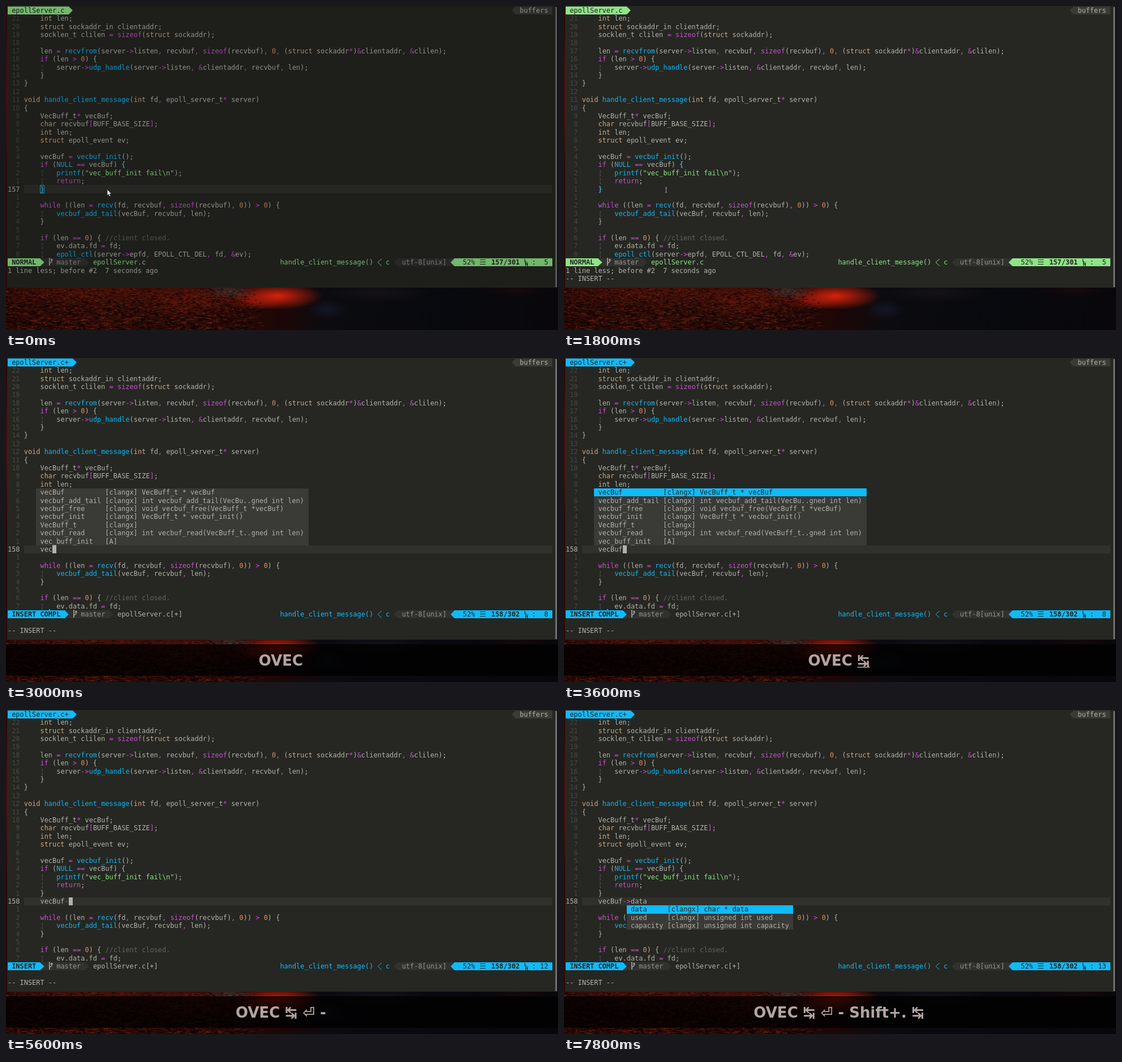
Animation, 976 px wide and 574 px high, one loop 8 s. Source, as an HTML page with a canvas:

```html
<!DOCTYPE html>
<html lang="en">
<head>
<meta charset="utf-8">
<title>Code completion</title>
<style>
  html, body { margin: 0; width: 100%; height: 100%; overflow: hidden; background: #000; }
  canvas { display: block; }
</style>
</head>
<body>
<canvas id="stage" width="976" height="574"></canvas>
<script>
const LOOP = 8000, CW = 7.185, RH = 14.4, X0 = 3, Y0 = 0.6, CENTER = 486;
const MONO = '11.93px "DejaVu Sans Mono", monospace';
const KEYS = 'bold 26px "DejaVu Sans", sans-serif';
const C = {
  bg: '#262722', line: '#30302c', text: '#b2b2aa', dark: '#22231f', num: '#464741', guide: '#5c5d56',
  type: '#cfa883', key: '#c94fd0', func: '#10b5f3', str: '#8be37f', lit: '#d98a66', note: '#63645d',
  green: '#8ee487', cyan: '#0fbbfb', panel: '#3a3a37', section: '#31322e'
};

const code = `    int len;
    struct sockaddr_in clientaddr;
    socklen_t clilen = sizeof(struct sockaddr);

    len = recvfrom(server->listen, recvbuf, sizeof(recvbuf), 0, (struct sockaddr*)&clientaddr, &clilen);
    if (len > 0) {
    ¦   server->udp_handle(server->listen, &clientaddr, recvbuf, len);
    }
}

void handle_client_message(int fd, epoll_server_t* server)
{
    VecBuff_t* vecBuf;
    char recvbuf[BUFF_BASE_SIZE];
    int len;
    struct epoll_event ev;

    vecBuf = vecbuf_init();
    if (NULL == vecBuf) {
    ¦   printf("vec_buff_init fail\\n");
    ¦   return;
    }

    while ((len = recv(fd, recvbuf, sizeof(recvbuf), 0)) > 0) {
    ¦   vecbuf_add_tail(vecBuf, recvbuf, len);
    }

    if (len == 0) { //client closed.
    ¦   ev.data.fd = fd;
    ¦   epoll_ctl(server->epfd, EPOLL_CTL_DEL, fd, &ev);`.split('\n');

const words = {
  col: 7, end: 74, row: 16,
  items: ['vecBuf          [clangx] VecBuff_t * vecBuf',
    'vecbuf_add_tail [clangx] int vecbuf_add_tail(VecBu..gned int len)',
    'vecbuf_free     [clangx] void vecbuf_free(VecBuff_t *vecBuf)',
    'vecbuf_init     [clangx] VecBuff_t * vecbuf_init()',
    'VecBuff_t       [clangx]',
    'vecbuf_read     [clangx] int vecbuf_read(VecBuff_t..gned int len)',
    'vec_buff_init   [A]']
};
const members = {
  col: 15, end: 56, row: 24,
  items: ['data     [clangx] char * data', 'used     [clangx] unsigned int used',
    'capacity [clangx] unsigned int capacity']
};

// Each step changes part of the state; the rest carries over.
const TAB = '↹', RET = '⏎';
const steps = [
  [0, { mouse: 'arrow', dim: true, mode: 'NORMAL', cursor: 'hollow', typed: null, col: 5, msg: true, insert: false, keys: null }],
  [100, { mouse: 'beam' }],
  [600, { dim: false, cursor: 'block' }],
  [1200, { cursor: '' }],
  [1800, { insert: true, moving: true }],
  [1900, { moving: false, mode: 'INSERT', typed: '', cursor: 'block', keys: 'O', under: 1 }],
  [2100, { under: 0 }],
  [2400, { keys: 'OV', under: 1 }],
  [2500, { typed: 'v', col: 6 }],
  [2600, { keys: 'OVE' }],
  [2700, { typed: 've', col: 7, cursor: '' }],
  [2800, { cursor: 'block', under: 0 }],
  [2900, { keys: 'OVEC', under: 1, typed: 'vec', mouse: '' }],
  [3000, { mode: 'INSERT COMPL', col: 8, popup: words, pick: -1, msg: false, under: 0 }],
  [3600, { typed: 'vecBuf', pick: 0, keys: 'OVEC ' + TAB, under: 1 }],
  [3800, { under: 0 }],
  [4200, { cursor: '' }],
  [4400, { cursor: 'block', keys: `OVEC ${TAB} ${RET}`, under: 1 }],
  [4600, { mode: 'INSERT', popup: null, col: 11, under: 0 }],
  [5300, { keys: `OVEC ${TAB} ${RET} -`, under: 1, typed: 'vecBuf-' }],
  [5500, { col: 12 }],
  [5600, { under: 0 }],
  [5800, { keys: `OVEC ${TAB} ${RET} - Shift+.`, under: 7, typed: 'vecBuf->' }],
  [5900, { mode: 'INSERT COMPL', popup: members, pick: -1, col: 13 }],
  [6300, { cursor: '', under: 0 }],
  [6900, { cursor: 'block' }],
  [7200, { keys: `OVEC ${TAB} ${RET} - Shift+. ${TAB}`, under: 1 }],
  [7400, { typed: 'vecBuf->data', pick: 0, under: 0 }],
  [7800, { cursor: '' }]
];

const g = document.getElementById('stage').getContext('2d');
const X = col => X0 + col * CW, Y = row => Y0 + row * RH;

function rect(x, y, w, h, color) {
  g.fillStyle = color;
  g.fillRect(x, y, w, h);
}

function cells(from, to, row, color) {
  const x = Math.round(X(from)), y = Math.round(Y(row));
  rect(x, y, Math.round(X(to)) - x, Math.round(Y(row + 1)) - y, color);
}

function put(str, col, row, color = C.text, bold = false) {
  g.font = (bold ? 'bold ' : '') + MONO;
  g.fillStyle = color;
  g.fillText(str, X(col), Y(row) + 11.2);
}

function poly(points, color) {
  g.beginPath();
  points.forEach(p => g.lineTo(...p));
  g.fillStyle = color;
  g.fill();
}

function stroke(points, color, width = 1.2) {
  g.beginPath();
  points.forEach(p => g.lineTo(...p));
  g.strokeStyle = color;
  g.lineWidth = width;
  g.stroke();
}

// Powerline wedge filling one cell
function wedge(col, row, dir, color) {
  const base = Math.round(X(dir > 0 ? col : col + 1)), tip = X(dir > 0 ? col + 1 : col);
  poly([[base, Math.round(Y(row))], [tip, Y(row + 0.5)], [base, Math.round(Y(row + 1))]], color);
}

const token = /(\/\/.*)|(".*?")|\b(int|void|char|struct)\b|\b(if|while|return|sizeof)\b|(\b\w+(?=\()|NULL)|(\b\d+\b)|([-,=*&<>[\]])|(¦)/g;
const tints = [C.note, C.str, C.type, C.key, C.func, C.lit, C.key, C.guide];

function putCode(str, row) {
  let at = 0;
  for (const m of str.matchAll(token)) {
    put(str.slice(at, m.index), 4 + at, row);
    put(m[0], 4 + m.index, row, tints[m.slice(1).findIndex(Boolean)]);
    at = m.index + m[0].length;
  }
  put(str.slice(at), 4 + at, row);
}

function makeWallpaper() {
  const cv = document.createElement('canvas');
  cv.width = 976; cv.height = 574;
  const w = cv.getContext('2d');
  const base = w.createLinearGradient(0, 0, 976, 0);
  [[0, '#2c0a06'], [0.2, '#300d08'], [0.38, '#2c0a07'], [0.5, '#1c0706'], [0.58, '#0b0b10'],
    [0.8, '#08090e'], [1, '#09070a']].forEach(s => base.addColorStop(...s));
  w.fillStyle = base;
  w.fillRect(0, 0, 976, 574);
  const glow = (x, y, rx, ry, rgb, a) => {
    w.save();
    w.translate(x, y);
    w.scale(rx, ry);
    const r = w.createRadialGradient(0, 0, 0, 0, 0, 1);
    r.addColorStop(0, `rgba(${rgb},${a})`);
    r.addColorStop(1, `rgba(${rgb},0)`);
    w.fillStyle = r;
    w.fillRect(-1, -1, 2, 2);
    w.restore();
  };
  glow(0, 160, 6, 130, '120,14,8', 0.6);
  glow(150, 508, 170, 26, '105,24,12', 0.45);
  glow(330, 520, 110, 36, '125,26,12', 0.5);
  glow(480, 514, 80, 24, '235,38,12', 0.9);
  glow(440, 522, 55, 16, '190,30,10', 0.5);
  glow(395, 506, 48, 14, '62,54,52', 0.85);
  glow(568, 538, 35, 18, '24,32,52', 0.6);
  glow(660, 508, 90, 18, '32,26,28', 0.5);
  glow(900, 503, 60, 14, '38,10,10', 0.5);

  // Ripples grow towards the viewer.
  let seed = 7;
  const rnd = () => (seed = seed * 16807 % 2147483647) / 2147483647;
  for (let i = 0; i < 3000; i++) {
    const depth = rnd(), x = rnd() * (400 + rnd() * 60) - 4, dark = rnd() < 0.62;
    w.fillStyle = dark ? 'rgba(6,3,3,.6)' : `rgba(${120 + rnd() * 60},${40 + rnd() * 25},22,.32)`;
    w.fillRect(x, 500 + depth * 74, 2 + rnd() * (3 + 5 * depth), 0.7 + rnd() * (0.6 + depth));
  }
  return cv;
}
const wallpaper = makeWallpaper();

function drawText(s) {
  const shift = s.typed === null ? 0 : 1, current = 22 + shift;
  if (!s.moving) cells(4, 134, current, C.line);
  for (let row = 1; row <= 30; row++) {
    const n = Math.abs(row - current);
    if (n) put(String(n).padStart(3), 0, row, C.num);
    else if (s.moving) put('  1', 0, row, C.num);
    else put(String(157 + shift), 0, row);
    if (shift && row === current) putCode('    ' + s.typed, row);
    else putCode(code[row - 1 - (row > 22 ? shift : 0)], row);
  }
  if (!shift) {
    put('{', 28, 19, C.func);
    put('}', 8, 22, C.func);
  }
  const col = 8 + (s.typed || '').length;
  if (s.cursor === 'block') {
    cells(col, col + 1, current, C.text);
    if (!shift) put('}', col, current, C.dark);
  } else if (s.cursor === 'hollow') {
    g.strokeStyle = C.func;
    g.lineWidth = 1;
    g.strokeRect(60.5, 317.5, 7, 14);
  }
}

function drawBars(s) {
  const normal = s.mode === 'NORMAL', accent = normal ? C.green : C.cyan;
  const tab = 'epollServer.c' + (normal ? '' : '+'), tabEnd = tab.length + 2;
  cells(0, tabEnd, 0, accent);
  wedge(tabEnd, 0, 1, accent);
  put(tab, 1, 0, C.dark);
  cells(125, 134, 0, C.panel);
  wedge(124, 0, -1, C.panel);
  put('buffers', 126, 0);

  const a = s.mode.length + 2, y = Y(31);
  cells(a, a + 11, 31, C.section);
  wedge(a + 11, 31, 1, C.section);
  cells(0, a, 31, accent);
  wedge(a, 31, 1, accent);
  put(s.mode, 1, 31, C.dark, true);
  const bx = X(a + 2);
  stroke([[bx + 2, y - 1], [bx + 2, y + 13]], C.text, 1.5);
  stroke([[bx + 2, y + 9], [bx + 6, y + 6], [bx + 6, y + 1]], C.text, 1.3);
  poly([[bx + 3.8, y + 3.5], [bx + 6, y], [bx + 8.2, y + 3.5]], C.text);
  if (a > 8) rect(76, 445, 2, 1.5, C.text);
  put('master', a + 4, 31, '#96968f');
  put(normal ? tab : 'epollServer.c[+]', a + 13, 31, normal ? C.green : C.text);

  put('handle_client_message()', 67, 31, accent);
  stroke([[X(92), y + 1], [X(91) + 0.5, y + 7.2], [X(92), y + 13.5]], accent, 1);
  put('c', 93, 31, accent);
  cells(96, 110, 31, C.section);
  wedge(95, 31, -1, C.section);
  put('utf-8[unix]', 97, 31, '#96968f');
  cells(110, 134, 31, accent);
  wedge(109, 31, -1, accent);
  put('52%', 112, 31, C.dark);
  for (const row of [449, 453, 457]) rect(838, row, 10, 1, C.dark);
  put(normal ? '157/301' : '158/302', 119, 31, C.dark, true);
  stroke([[917.5, y + 1], [917.5, y + 6], [920.5, y + 6]], C.dark);
  stroke([[918.5, y + 13.5], [918.5, y + 7], [922, y + 13], [922, y + 7]], C.dark);
  put(':' + String(s.col).padStart(3), 129, 31, C.dark);

  if (s.msg) put('1 line less; before #2  7 seconds ago', 0, 32);
  if (s.insert) put('-- INSERT --', 0, 33);
}

function drawPopup({ col, end, row, items }, pick) {
  items.forEach((item, i) => {
    cells(col, end, row + i, i === pick ? C.cyan : C.panel);
    put(item, col + 1, row + i, i === pick ? C.dark : C.text);
  });
}

function drawKeys({ keys, under }) {
  rect(0, 507, 976, 56, 'rgba(0,0,0,.78)');
  g.font = KEYS;
  g.fillStyle = '#b3a5a1';
  const width = g.measureText(keys).width, x = CENTER - width / 2;
  g.fillText(keys, x, 544.5);
  if (under) {
    const from = g.measureText(keys.slice(0, -under)).width;
    g.fillRect(x + from, 547, width - from, 1.5);
  }
}

function drawMouse(kind) {
  if (kind === 'arrow') {
    const shape = [[179, 325], [179, 335.5], [181.3, 333.5], [183, 337.5], [184.8, 336.6], [183.2, 333], [186.3, 332.6], [179, 325]];
    poly(shape, '#e6e6e6');
    stroke(shape, '#222', 0.6);
  } else if (kind === 'beam') {
    rect(180, 322, 1, 8, '#a8a8a4');
    rect(178.5, 321.5, 4, 0.7, '#a8a8a4');
    rect(178.5, 329.8, 4, 0.7, '#a8a8a4');
  }
}

function draw(s) {
  g.drawImage(wallpaper, 0, 0);
  rect(2, 0, 973, 499, C.bg);
  drawText(s);
  drawBars(s);
  if (s.popup) drawPopup(s.popup, s.pick);
  rect(971.5, 2, 2.5, 496, '#7d7d79');
  if (s.dim) rect(2, 0, 973, 499, 'rgba(0,0,0,.2)');
  drawMouse(s.mouse);
  if (s.keys) drawKeys(s);
}

let start, shown = 0;
function tick(now) {
  start ??= now;
  const t = Math.max(0, now - start) % LOOP, past = steps.filter(step => step[0] <= t);
  if (past.length !== shown) {
    shown = past.length;
    draw(Object.assign({}, ...past.map(step => step[1])));
  }
  requestAnimationFrame(tick);
}
tick(performance.now());
</script>
</body>
</html>
```
